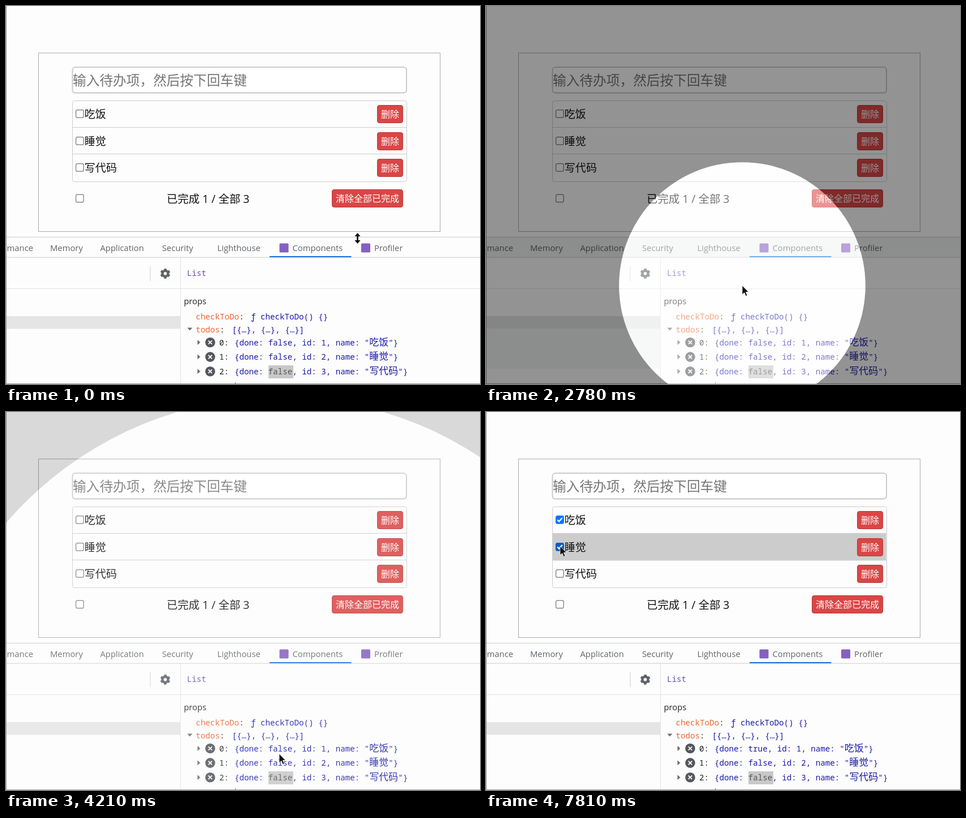
Animation, 838 px wide and 668 px high, one loop 8 s. Source, as an HTML page:

```html
<!DOCTYPE html>
<html lang="zh">
<head>
<meta charset="utf-8">
<title>Todo list</title>
<style>
html, body { margin: 0; width: 100%; height: 100%; overflow: hidden; background: #fdfdfd; }
svg { display: block; width: 838px; height: 668px; }
text { white-space: pre; }
.ui { font-family: "Open Sans", "Noto Sans CJK SC", "Noto Sans CJK", sans-serif; }
.tab { font-size: 14.8px; fill: #5f6368; }
.mono { font: 14.2px "Noto Sans Mono", "DejaVu Sans Mono", "Noto Sans CJK SC", "Noto Sans CJK", monospace; fill: #1a1aa6; }
.item { font-size: 19.1px; fill: #111; }
.count { font-size: 19.4px; fill: #111; }
.key { fill: #ef6632; }
.dark { fill: #222; }
</style>
</head>
<body>
<svg id="stage" viewBox="0 0 838 668" xmlns="http://www.w3.org/2000/svg">
  <rect width="838" height="668" fill="#fdfdfd"/>
  <g id="app"></g>
  <g id="tools"></g>
  <path d="M.5 0V667.5H838" fill="none" stroke="#999"/>
  <path id="dim" fill-rule="evenodd"/>
  <circle id="spot" fill="#fff"/>
  <path id="resize" d="M621.5 401l5 6h-3.7v7h3.7l-5 6l-5-6h3.7v-7h-3.7z" fill="#000"/>
  <path id="arrow" d="M0 0V16L3.7 12.6L6.3 18.6L8.9 17.5L6.4 11.6H11.2Z" fill="#111" stroke="#fff" stroke-width=".7"/>
</svg>
<script>
const LOOP = 8000;
const ROW = 47.6;
const $ = id => document.getElementById(id);
const put = (el, attrs) => { for (const k in attrs) el.setAttribute(k, attrs[k]); };
const box = (x, y, w, h, fill, rest = '') =>
  `<rect x="${x}" y="${y}" width="${w}" height="${h}" fill="${fill}" ${rest}/>`;
const line = (d, color) => `<path d="${d}" fill="none" stroke="${color}"/>`;
const label = (x, y, cls, text, rest = '') =>
  `<text x="${x}" y="${y}" class="${cls}" ${rest}>${text}</text>`;

// Page
const names = ['吃饭', '睡觉', '写代码'];
const rowTop = i => Math.round(167 + ROW * i);
const checkTop = i => Math.round(183 + ROW * i);

const checkbox = (y, id) => `<g id="${id}" transform="translate(123 ${y})">
  <rect x=".6" y=".6" width="13.6" height="13.6" rx="2.5" fill="#fff" stroke="#767676" stroke-width="1.2"/>
  <path d="M3.2 7.6L6.1 10.6L11.8 4.1" fill="none" stroke="#fff" stroke-width="2.2" opacity="0"/></g>`;
const button = (x, y, w, text) => box(x, y, w, 31, '#da4646', 'rx="3.5" stroke="#b83a34"') +
  label(x + w / 2, y + 21.6, 'ui', text, 'font-size="16" fill="#fff" text-anchor="middle"');
const row = (name, i) =>
  box(118, rowTop(i), 589.5, ROW, '#ccc', `id="hover${i}"`) +
  (i ? line(`M118 ${rowTop(i) - .5}H708`, '#ccc') : '') +
  checkbox(checkTop(i), 'check' + i) +
  label(138.7, 198 + ROW * i, 'ui item', name) +
  button(656.5, Math.round(175 + ROW * i) + .5, 45, '删除');

$('app').innerHTML =
  box(57.5, 83, 710, 315.5, 'none', 'stroke="#aaa"') +
  box(117.5, 108.2, 590.5, 45.3, '#fff', 'rx="5" stroke="#c6c6c6" stroke-width="1.8"') +
  label(118, 140, 'ui', '输入待办项，然后按下回车键', 'font-size="23.7" fill="#757575"') +
  names.map(row).join('') +
  box(117.5, 167.5, 591, 143, 'none', 'rx="4" stroke="#ccc"') +
  checkbox(332.5, 'checkAll') +
  label(284, 347.8, 'ui count', '已完成 1 / 全部 3') +
  button(576.5, 324.5, 125, '清除全部已完成');

// Developer panel
const value = (name, i, done) =>
  `{done: ${done}, id: ${i + 1}, name: "<tspan font-size="17">${name}</tspan>"}`;
const entry = (name, i) => {
  const y = 594.5 + 25.6 * i;
  return `<path d="M338.5 ${y - 4.5}l5 4.5l-5 4.5z" fill="#6e6e6e"/>
    <circle cx="361" cy="${y}" r="8.8" fill="#54575d"/>
    <path d="M357.8 ${y - 3.2}l6.4 6.4m0-6.4l-6.4 6.4" stroke="#fff" stroke-width="1.8"/>` +
    label(377, y + 5, 'mono dark', i + ':') +
    label(404, y + 5, 'mono', value(name, i, false), `id="entry${i}"`);
};
const tabs = [[78, 'Memory'], [166.5, 'Application'], [276, 'Security'],
  [373.5, 'Lighthouse'], [506.5, 'Components'], [651, 'Profiler']];

$('tools').innerHTML =
  `<g id="tint">${box(0, 409, 838, 35, '#f1f3f3') + box(0, 571, 308, 70, '#f1f3f3')}</g>` +
  line('M0 408.5H838M0 444.2H838', '#ccc') +
  line('M308.5 445V668M0 499.5H838', '#e2e2e2') +
  line('M255 460V486', '#ccc') +
  box(0, 548, 308, 22.5, '#e5e5e5') +
  label(48, 432.7, 'ui tab', 'rmance', 'text-anchor="end"') +
  tabs.map(([x, text]) => label(x, 432.7, 'ui tab', text)).join('') +
  [483.5, 628].map(x => box(x, 419.5, 16, 16, '#8560c0', 'rx="1.5"')).join('') +
  box(466, 442, 144.5, 2, '#1a6fdc') +
  `<g fill="none" stroke="#5f6368" transform="translate(281.5 472.8) rotate(14)">
   <circle r="5" stroke-width="4.4"/>
   <circle r="7.5" stroke-width="2.8" stroke-dasharray="4.2 3.654"/></g>` +
  label(320, 477, 'mono', 'List', 'style="fill:#6a51b2"') +
  label(314.5, 527.3, 'ui tab', 'props', 'style="fill:#222"') +
  label(335.5, 553.5, 'mono', '<tspan class="key">checkToDo</tspan><tspan class="dark">:</tspan>') +
  label(433, 553.5, 'mono', 'ƒ', 'font-style="italic"') +
  label(450, 553.5, 'mono', 'checkToDo() {}') +
  '<path d="M320.5 568.5h9l-4.5 5z" fill="#6e6e6e"/>' +
  label(335.5, 576.5, 'mono', '<tspan class="key">todos</tspan><tspan class="dark">:</tspan>') +
  label(399.5, 576.5, 'mono', '[{…}, {…}, {…}]') +
  box(464, 635, 44, 23, '#c8c8c8') +
  names.map(entry).join('') +
  line('M405.5 665V668', '#555');
$('entry2').innerHTML = value(names[2], 2, '<tspan fill="#555">false</tspan>');

// Pointer moves: start, end, x, y
const home = [622, 402];
const moves = [
  [380, 530, 359, 445], [530, 680, 473, 435], [840, 1100, 468, 477], [1350, 1720, 465, 533],
  [2220, 2370, 453, 494], [3050, 3300, 441, 662], [3430, 4080, 491, 639], [4080, 4260, 481, 596],
  [4260, 5060, 132, 204], [5060, 5210, 132, 193], [6700, 6820, 131, 217],
  [7200, 7320, 131, 233], [7660, 7810, 131, 237]
];
const clamp = v => Math.min(1, Math.max(0, v));
const smooth = f => f * f * (3 - 2 * f);

function pointer(t) {
  return moves.reduce(([px, py], [from, to, x, y]) => {
    const f = smooth(clamp((t - from) / (to - from)));
    return [px + (x - px) * f, py + (y - py) * f];
  }, home);
}

// cubic-bezier(.41, .52, 0, .94)
function ease(x) {
  if (x <= 0) return 0;
  if (x >= 1) return 1;
  let lo = 0, hi = 1;
  for (let i = 0; i < 20; i++) {
    const s = (lo + hi) / 2, r = 1 - s;
    if (1.23 * r * r * s + s ** 3 < x) lo = s; else hi = s;
  }
  return 1.56 * (1 - lo) ** 2 * lo + 2.82 * (1 - lo) * lo * lo + lo ** 3;
}

// The light trails the pointer by 30 ms
function drawSpotlight(t) {
  const level = t < 2620 ? 0 : ease((t - 2583) / 500) - ease((t - 4060) / 500);
  const [x, y] = pointer(t - 30);
  const r = 94.5 * (9 - 8 * level);
  put($('dim'), {
    d: `M0 0H838V668H0ZM${x - r} ${y}a${r} ${r} 0 1 0 ${2 * r} 0a${r} ${r} 0 1 0 ${-2 * r} 0Z`,
    opacity: level / 2
  });
  put($('spot'), { cx: x, cy: y, r, opacity: level / 2 });
}

function drawRow(i, x, y, pressed, on) {
  const hover = x > 117 && x < 708 && y >= rowTop(i) && y < rowTop(i + 1);
  put($('hover' + i), { opacity: hover ? 1 : 0 });
  const top = checkTop(i);
  const over = x >= 123 && x <= 138 && y >= top && y <= top + 15;
  const [rect, tick] = $('check' + i).children;
  const edge = pressed ? '#8d8d8d' : over ? '#4f4f4f' : '#767676';
  const blue = over ? '#005cc8' : '#0075ff';
  put(rect, { fill: on ? blue : '#fff', stroke: on ? blue : edge });
  put(tick, { opacity: on ? 1 : 0 });
}

let wasDone;
function draw(t) {
  const [x, y] = pointer(t);
  const moved = t >= 30;
  put($('resize'), { opacity: moved ? 0 : 1 });
  put($('arrow'), { opacity: moved ? 1 : 0, transform: `translate(${Math.round(x)} ${Math.round(y)})` });
  drawRow(0, x, y, t >= 5460, t >= 5530);
  drawRow(1, x, y, t >= 7490, t >= 7540);
  drawRow(2, x, y, false, false);
  put($('tint'), { opacity: t >= 2620 && t < 4080 ? 1 : 0 });
  const done = t >= 6400;
  if (done !== wasDone) $('entry0').innerHTML = value(names[0], 0, done);
  wasDone = done;
  drawSpotlight(t);
}

const start = performance.now();
function tick() {
  draw((performance.now() - start) % LOOP);
  requestAnimationFrame(tick);
}
tick();
</script>
</body>
</html>
```
